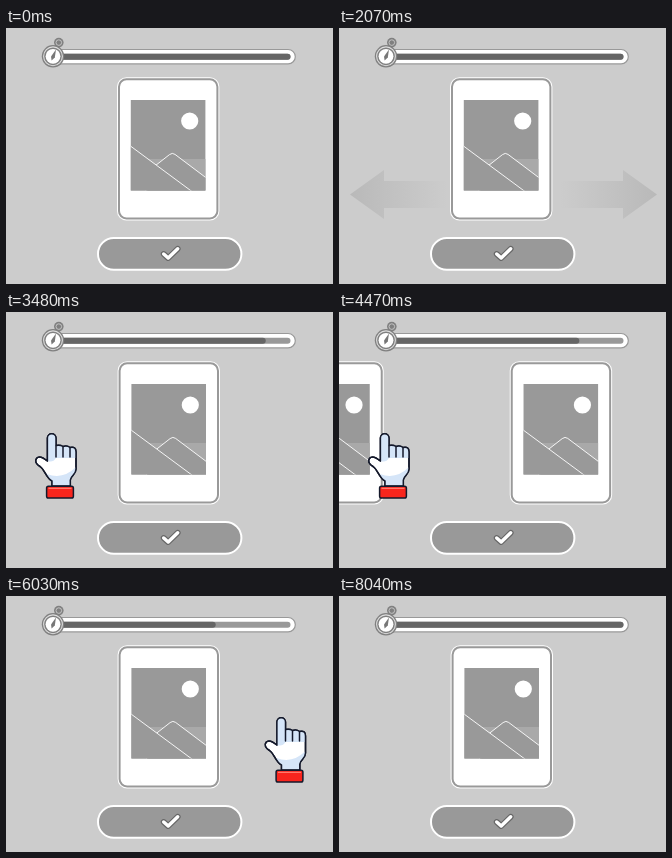
An HTML page for the animation above (8100 ms loop, 327x256 px).

```html
<!DOCTYPE html>
<html lang="en">
<head>
<meta charset="utf-8">
<title>Swipe and confirm</title>
<style>
  html, body { margin: 0; width: 100%; height: 100%; overflow: hidden; background: #ccc; }
  svg { display: block; width: 100%; height: 100%; }
</style>
</head>
<body>
<svg viewBox="0 0 327 256">
  <defs>
    <linearGradient id="fade" gradientUnits="userSpaceOnUse" x1="11" x2="108" y1="0" y2="0">
      <stop offset="0" stop-color="#b9b9b9"/>
      <stop offset="1" stop-color="#b9b9b9" stop-opacity="0"/>
    </linearGradient>
    <path id="arrow" fill="url(#fade)" d="M11 166.5 45 142V153H110V180H45V191Z"/>
    <clipPath id="photo"><rect x="124.8" y="72" width="74.6" height="90.5"/></clipPath>
    <g id="card">
      <rect x="111" y="49.3" width="102.4" height="143.2" rx="9.5" fill="#fff"/>
      <rect x="113" y="51.3" width="98.4" height="139.2" rx="7.5" fill="#fff" stroke="#999" stroke-width="2"/>
      <g clip-path="url(#photo)" stroke-width=".9">
        <path fill="#999" d="M124 71H200V163H124Z"/>
        <path fill="#a9a9a9" d="M142 131H200V163H142Z"/>
        <path fill="#999" stroke="#fff" d="M140 145 163.5 126.6Q166.3 124.3 169 126.4L203 152V170H140Z"/>
        <path fill="#999" stroke="#fff" d="M122 116.2 188 165H122Z"/>
        <circle cx="183.7" cy="93" r="8.6" fill="#fff"/>
      </g>
    </g>
  </defs>

  <rect width="327" height="256" fill="#ccc"/>
  <g id="arrows">
    <use id="left" href="#arrow"/>
    <use id="right" href="#arrow"/>
  </g>
  <g id="cards">
    <use href="#card"/>
    <use href="#card" x="229.6"/>
    <use href="#card" x="458"/>
  </g>

  <rect x="46" y="21.5" width="243.3" height="14.4" rx="7.2" fill="#fff" stroke="#999" stroke-width="1.2"/>
  <rect x="52" y="25.8" width="232.5" height="6" rx="3" fill="#999"/>
  <rect id="bar" x="52" y="25.8" height="6" rx="3" fill="#666"/>

  <g>
    <path stroke="#808080" stroke-width="4" d="M49.8 20 51.5 16"/>
    <circle cx="52.8" cy="14.6" r="4.8" fill="#808080"/>
    <circle cx="52.8" cy="14.6" r="2.8" fill="none" stroke="#c4c4c4"/>
    <circle cx="47" cy="28.3" r="11.2" fill="#808080"/>
    <circle cx="47" cy="28.3" r="9.4" fill="none" stroke="#ddd" stroke-width="1.1"/>
    <circle cx="47" cy="28.3" r="7.4" fill="#fff"/>
    <path fill="#777" d="M50 21.4 48.8 29.5 45.6 32.6 45 28.6Z"/>
  </g>

  <g id="button">
    <rect x="92" y="210" width="143.4" height="31.8" rx="15.9" fill="#999" stroke="#fff" stroke-width="2"/>
    <g fill="none" stroke-linejoin="round" stroke-linecap="round">
      <path stroke="#666" stroke-width="5.8" d="M157.7 226 162.2 230 171.7 220.8"/>
      <path stroke="#fff" stroke-width="3.5" d="M157.7 226 162.2 230 171.7 220.8"/>
    </g>
  </g>

  <g id="hand" stroke="#14192b" stroke-width="1.5" stroke-linejoin="round" stroke-linecap="round">
    <path id="skin" fill="#fff"/>
    <path id="shade" fill="#d5e5f8" stroke="none"/>
    <path id="outline" fill="none"/>
    <path fill="none" d="M21 13V24M28 14V24M35 15V24"/>
    <rect x="11.6" y="53.2" width="26.8" height="11.8" rx="1.8" fill="#f8251d"/>
    <path stroke="#ff7a6b" stroke-width="1.2" d="M14 55.4H36"/>
  </g>
</svg>
<script>
const LOOP = 8100;
const HOME = 146, DRAG = 390, SETTLE = 250, PULL = 115, PITCH = 229;
const ARRIVE = 2220, LEAVE = 7290;
// Start time and signed finger travel of each swipe.
const swipes = [[2700, -117], [3960, -117], [5370, 112.5]];

const el = id => document.getElementById(id);
const set = (id, name, value) => el(id).setAttribute(name, value);
const clamp = p => Math.min(1, Math.max(0, p));
const ramp = (t, from, span) => clamp((t - from) / span);
const ease = (t, from, span) => {
  const p = ramp(t, from, span);
  return p * p * (3 - 2 * p);
};
// Rises at one time, falls back at another.
const hold = (t, on, off, span) => ramp(t, on, span) - ramp(t, off, span);
const total = rule => swipes.reduce((sum, [start, travel]) => sum + rule(start, travel), 0);

function drawArrows(t) {
  const bounce = 5 * Math.sin(2 * Math.PI * ramp(t, 510, 990)) ** 2;
  set("arrows", "opacity", hold(t, 120, 1500, 240) + hold(t, 1830, ARRIVE, 240));
  set("left", "transform", `translate(${-bounce})`);
  set("right", "transform", `translate(${329 + bounce}) scale(-1 1)`);
}

function drawCards(t) {
  const x = total((start, travel) => Math.sign(travel) *
    (PULL * ease(t, start, DRAG) + (PITCH - PULL) * ease(t, start + DRAG, SETTLE)));
  set("cards", "transform", `translate(${x})`);
}

function drawBar(t) {
  const left = 1 - ramp(t, ARRIVE, LEAVE - ARRIVE) + ramp(t, LEAVE, 750);
  set("bar", "width", 133 + 99.5 * left);
}

function drawHand(t, press) {
  const x = HOME + total((start, travel) =>
    travel * (ease(t, start, DRAG) - ease(t, start + 790, 250)));
  const y = 135 - 14 * ease(t, ARRIVE, 270) + 101 * ease(t, 6060, 360);
  const top = 5 + 5 * press;
  const fingers = `V${top}A4.3 4.3 0 0 1 21 ${top}V12.5` +
    "Q25 11.5 28 13.5Q32 12 35 14.5Q41 13 41 19";
  const body = `M12.4 28${fingers}V36C41 42 36 42 35.3 47V53H17V48` +
    "C11 45 10 37 5 33.5C1 31 -.5 28 1.6 25.2C4 22.5 8 24.3 12.4 28Z";
  set("skin", "d", body);
  set("outline", "d", body);
  set("shade", "d", `M12.4 28${fingers}V25H21Q18 30 12.4 28Z` +
    "M12 41Q28 47 41 34V36C41 42 36 42 35.3 47V53H17V48Q13 46 12 41Z");
  set("hand", "opacity", hold(t, ARRIVE, LEAVE, 210));
  set("hand", "transform", `translate(${x} ${y})`);
}

function draw(t) {
  const tap = hold(t, 6600, 6960, 100);
  const grip = total(start => hold(t, start - 240, start + DRAG, 60));
  drawArrows(t);
  drawCards(t);
  drawBar(t);
  drawHand(t, grip + tap);
  set("button", "transform",
    `translate(163.7 225.9) scale(${1 - .04 * tap}) translate(-163.7 -225.9)`);
}

const start = performance.now();
function tick() {
  draw((performance.now() - start) % LOOP);
  requestAnimationFrame(tick);
}
tick();
</script>
</body>
</html>
```
